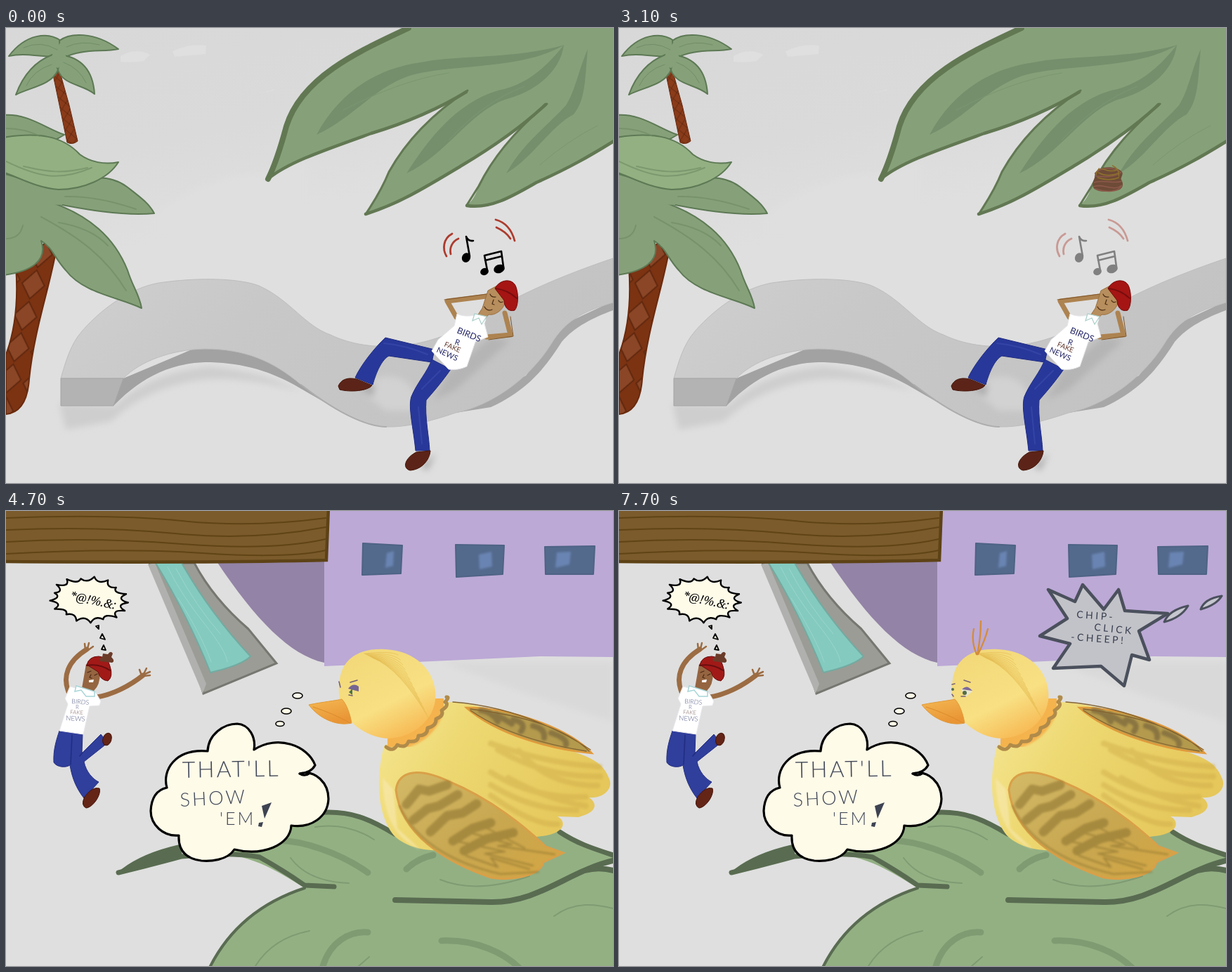
An HTML page that plays this animation: 864x648 px, repeating every 8700 ms.

```html
<!DOCTYPE html>
<html lang="en">
<head>
<meta charset="utf-8">
<title>Beach bird</title>
<style>
html, body { margin: 0; width: 100%; height: 100%; overflow: hidden; background: #dfdfdf }
svg { display: block; width: 100%; height: 100% }
.line { fill: none; stroke-linecap: round; stroke-linejoin: round }
.soft { filter: url(#blur) }
.brushed { filter: url(#smudge) }
.ink { fill: #fffbe9; stroke: #000; stroke-linejoin: round }
.hand { font-family: Lato, "Open Sans", sans-serif }
.leaf { fill: #86a179; stroke: #5d7955; stroke-width: 2; stroke-linejoin: round }
</style>
</head>
<body>
<svg viewBox="0 0 864 648">
<defs>
  <filter id="blur" x="-30%" y="-30%" width="160%" height="160%"><feGaussianBlur stdDeviation="5"/></filter>
  <filter id="smudge"><feGaussianBlur stdDeviation="1.5"/></filter>
  <linearGradient id="sky" x2="0.3" y2="1"><stop stop-color="#d8d8d8"/><stop offset=".3" stop-color="#dadada"/><stop offset=".5" stop-color="#dfdfdf"/></linearGradient>
  <linearGradient id="stone" x2="1" y2=".3"><stop stop-color="#d0d0d0"/><stop offset=".4" stop-color="#c8c8c8"/><stop offset="1" stop-color="#c3c3c3"/></linearGradient>
  <linearGradient id="plumage" x2="1" y2=".4"><stop stop-color="#f6e795"/><stop offset=".4" stop-color="#edd871"/><stop offset="1" stop-color="#e5c75b"/></linearGradient>
  <linearGradient id="wingFill" x2="1" y2=".8"><stop stop-color="#d3b967"/><stop offset=".6" stop-color="#c8a750"/><stop offset="1" stop-color="#d2a645"/></linearGradient>
  <linearGradient id="headFill" x1=".2" x2=".75" y2="1"><stop stop-color="#f2d878"/><stop offset=".6" stop-color="#f8e083"/><stop offset="1" stop-color="#f7b650"/></linearGradient>
  <linearGradient id="beakFill" y2="1" x2=".4"><stop stop-color="#f4b853"/><stop offset="1" stop-color="#e99535"/></linearGradient>
  <pattern id="bark" width="36" height="46" patternUnits="userSpaceOnUse" patternTransform="rotate(14)">
    <rect width="36" height="46" fill="#7c3312"/><path d="M18 2L34 21 18 44 2 25Z" fill="#8a4626" stroke="#61280f" stroke-width="2"/>
  </pattern>
  <pattern id="barkSmall" width="13" height="15" patternUnits="userSpaceOnUse" patternTransform="rotate(-10)">
    <rect width="13" height="15" fill="#8a3b19"/><path d="M0 0L13 15M13 0L0 15" stroke="#5f2810"/>
  </pattern>
</defs>

<g id="beach">
  <rect width="864" height="648" fill="url(#sky)"/>
  <g fill="#dfdfdf">
    <path d="M163 40Q185 27 205 38L196 47Q180 50 163 48ZM237 33Q260 22 285 25L284 37 240 41Z"/>
    <path class="soft" d="M205 270Q290 205 374 208L430 190V300H205Z"/>
    <path d="M360 93L383 87 380 89Z"/>
  </g>
  <!-- Bench -->
  <path class="soft" d="M76 535L155 538Q205 490 290 482 370 490 420 518 320 490 255 505 190 520 150 560L85 572Z" fill="#cecece"/>
  <path d="M167 499L283 450C350 450 420 490 462 538L410 508C370 486 330 476 283 476C230 478 190 500 153 538Z" fill="#a2a2a2"/>
  <path d="M864 389L798 420 740 495 640 548 690 540C745 515 770 480 791 447 810 425 835 413 864 402Z" fill="#a7a7a7"/>
  <path d="M78 499C85 475 92 450 108 432C140 395 185 366 225 362C285 354 340 358 362 368C405 388 425 424 462 437C520 465 600 455 650 425C700 400 740 370 864 328V391C820 404 795 418 776 450C745 500 690 538 640 548C605 560 570 569 541 568C497 563 460 540 420 508C380 474 340 457 283 457C235 458 190 475 167 499Z" fill="url(#stone)" stroke="#bdbdbd"/>
  <path d="M78 499H167L153 538H78Z" fill="#b3b3b3" stroke="#a4a4a4"/>
  <path class="line" d="M420 508C480 555 520 568 541 568" stroke="#adadad" stroke-width="2"/>
  <path class="soft" d="M500 512C545 480 590 500 585 545L540 545Z" fill="#d2d2d2"/>
  <path class="soft" d="M630 490L690 440 718 445 640 515 608 530Z" fill="#aaa" opacity=".6"/>

  <!-- Small palm -->
  <path d="M66 62L76 60 90 110 102 161Q95 167 87 163L75 105Z" fill="url(#barkSmall)" stroke="#67290f"/>
  <g class="leaf">
    <path d="M78 18C60 5 28 8 4 40C30 34 50 43 78 40Z"/>
    <path d="M76 18C90 7 125 4 160 30C135 35 110 28 78 44Z"/>
    <path d="M66 38C40 48 24 68 14 95C35 84 64 82 74 60Z"/>
    <path d="M77 38C108 42 124 62 126 94C110 80 82 82 74 60Z"/>
    <path d="M67 36L78 20 87 45 74 57 60 51Z" stroke="none"/>
    <path class="line" d="M25 28Q50 17 73 31M86 27Q107 17 133 24M29 82Q39 60 65 52M82 49Q104 57 114 78" stroke="#718d68" stroke-width="1"/>
  </g>
  <!-- Large palm -->
  <path d="M56 306L71 318C62 370 40 430 33 500C31 530 20 548 0 550V465C15 425 17 380 14 340Z" fill="url(#bark)" stroke="#6a2a0d" stroke-width="2"/>
  <g class="leaf">
    <path d="M-4 124C30 121 55 142 83 152C60 168 25 171-4 165Z"/>
    <path d="M75 230C115 207 150 210 172 226C190 240 204 250 211 264C165 268 110 258 70 250Z"/>
    <path d="M-4 207L75 230 52 244C120 265 155 300 173 345C180 368 190 380 193 399C160 383 110 378 85 345C68 326 67 314 50 303C60 332 35 347-4 352Z"/>
    <path d="M30 215L85 228 80 252 20 250Z" stroke="none"/>
    <path d="M-4 156C45 148 80 153 105 180C120 191 140 195 160 191C145 215 110 230 75 230C45 228 20 214-4 205Z" fill="#93b082"/>
    <path class="line" d="M0 190C45 212 75 219 122 199M25 197C60 205 80 208 116 199M0 143Q26 143 48 154M84 240Q130 239 185 258M50 269C104 298 142 326 171 374M75 277Q122 285 145 310M0 300Q20 300 24 281" stroke="#718c65" stroke-width="2" opacity=".65"/>
  </g>
  <!-- Overhanging fronds -->
  <path d="M578 0C500 35 420 70 398 140C390 170 383 195 373 213C400 190 450 175 520 150C570 135 620 113 657 89C610 120 570 160 545 205C535 230 522 250 512 265C560 250 600 225 650 195C700 165 740 135 770 108C720 150 690 190 673 225C668 240 662 248 656 252C690 258 720 240 755 220C800 200 830 183 870 158V-5Z" fill="#86a179"/>
  <g class="line" stroke="#627853">
    <path d="M573 0C500 34 421 70 399 140C391 170 383 195 373 215" stroke-width="8"/>
    <path d="M373 215C400 192 450 175 520 150C570 135 620 113 655 91M512 265C560 250 600 225 650 195C700 165 740 135 768 109M656 253C690 258 720 240 755 220C800 200 830 183 870 158" stroke-width="4.5"/>
    <path d="M657 89C610 120 570 160 545 205C535 230 522 250 512 265M770 108C720 150 690 190 673 225L656 252" stroke-width="3"/>
  </g>
  <g fill="#758f6d">
    <path d="M442 152C475 90 530 57 590 49C640 38 720 45 795 24C740 57 650 52 590 64C530 76 500 125 442 152Z"/>
    <path d="M570 207C600 160 640 107 700 89C740 82 770 55 794 24C790 60 755 91 710 102C660 120 625 182 570 207Z"/>
    <path d="M712 207C735 165 770 140 797 110C810 90 815 60 828 30C824 75 825 102 808 123C775 140 750 185 712 207Z"/>
    <path class="line" d="M480 117Q560 75 630 64M630 160Q680 105 738 83M760 195Q800 160 842 139" stroke="#7b9771"/>
  </g>

  <!-- Lounging man -->
  <path class="soft" d="M500 514L525 507 522 525ZM590 625L612 605 600 630Z" fill="#aaa"/>
  <g fill="#28389a" stroke="#202c82">
    <path d="M610 458L540 441C525 455 505 480 497 498L522 508C527 490 535 472 545 467L606 476Z"/>
    <path d="M606 472L633 486C620 505 605 522 598 530C596 555 602 580 603 602H583C580 570 572 540 577 525C585 505 600 490 606 472Z"/>
    <path class="line" d="M538 449Q570 452 600 465M592 514L618 488M587 540L592 592" stroke="#3444a6" stroke-width="2"/>
  </g>
  <g fill="#5c2418" stroke="#441509">
    <path d="M473 510C478 498 490 498 499 500L521 509C515 517 490 519 475 515Z"/>
    <path d="M584 604L604 602C603 615 592 629 575 630C564 627 567 613 584 604Z"/>
  </g>
  <g class="line" stroke-width="7" stroke="#ad8350">
    <path d="M641 412L628 389 684 382M684 440L718 437 710 406"/>
    <path d="M624 387L684 379M687 444L722 439 718 411" stroke="#80572c" stroke-width="1"/>
  </g>
  <path d="M686 374L699 367 711 388C709 402 695 410 687 408L680 416 670 411 678 399Z" fill="#b78e5d" stroke="#9a7040"/>
  <path class="line" d="M689 379Q691 384 697 383M701 388Q703 392 707 390M694 387L692 393 695 394M681 397Q685 404 692 401" stroke="#4b2d16" stroke-width="1.2"/>
  <path d="M696 371C703 357 722 356 726 369C730 380 729 397 724 402C714 405 709 396 709 388Z" fill="#a51513" stroke="#750b0a"/>
  <path class="line" d="M697 371Q714 373 727 385" stroke="#780d0d" stroke-width="2"/>
  <path d="M642 407Q652 412 668 409L683 415 681 421 686 440 668 447 656 482Q643 488 630 486L606 460 615 444 638 424Z" fill="#fff" stroke="#e5e5e9"/>
  <path d="M667 407L664 417 673 413 677 422 684 411Z" fill="#fff" stroke="#a9cec8" stroke-width="1.2"/>
  <g class="hand" fill="#252767">
    <text transform="translate(641 434) rotate(22)" font-size="12.5">BIRDS</text>
    <text transform="translate(638 450) rotate(20)" font-size="11">R</text>
    <text transform="translate(623 453) rotate(23)" font-size="10" fill="#60362a">FAKE</text>
    <text transform="translate(612 461) rotate(25)" font-size="11">NEWS</text>
  </g>

  <g id="notes">
    <path class="line" d="M635 293C622 300 621 315 627 325M644 300C635 304 631 313 633 322M697 273C712 277 720 288 724 303M698 284C707 288 713 292 718 300" stroke="#ad3b2e" stroke-width="2.8"/>
    <ellipse cx="655" cy="327" rx="6" ry="7" transform="rotate(25 655 327)"/>
    <ellipse cx="681" cy="347" rx="6" ry="5" transform="rotate(-20 681 347)"/>
    <ellipse cx="702" cy="343" rx="8" ry="6" transform="rotate(-20 702 343)"/>
    <path class="line" d="M660 325L655 297Q658 304 665 303M685 345L681 324 705 318 708 340M682 331L706 325" stroke="#000" stroke-width="2.6"/>
  </g>
  <g id="dropping">
    <path d="M-18-7C-16-19 14-20 21-9C22-4 17-1 20 2C24 10 20 17 8 17C-5 19-20 18-21 10C-22 3-18 1-18-7Z" fill="#6e4b37"/>
    <g class="line" stroke-width="1.5">
      <path d="M-18-8C-8-18 10-17 19-9 10-2-6-3-18-4M-19 5C-8 0 12 8 20 3M-20 11C-8 5 8 19 20 9M-18 14C0 20 15 18 20 10" stroke="#8d594b"/>
      <path d="M-13-9Q0-2 15-8M-9-15Q6-9 13-13M-14-2Q2 4 16-2M7-19Q17-14 16-4M-12-15Q-17-9-16-6" stroke="#8d702d"/>
    </g>
  </g>
</g>

<g id="revenge">
  <rect width="864" height="648" fill="#dfdfdf"/>
  <path class="soft" d="M620 215H864V300L740 260Z" fill="#d9d9d9"/>
  <path d="M453 0H864V208L760 207 453 221Z" fill="#bca9d6"/>
  <path d="M300 72H453V216C405 206 355 155 300 72Z" fill="#9383a6"/>
  <path d="M508 46L564 49 562 89 507 91ZM640 48L709 49 707 90 641 94ZM767 51L838 50 836 90 768 90Z" fill="#536a8d" stroke="#4e6385" stroke-width="2" stroke-linejoin="round"/>
  <path class="brushed" d="M542 60L552 57 551 78 540 81ZM673 62L691 58 692 79 674 83ZM784 59L804 58 802 76 782 81Z" fill="#6984b2"/>
  <path d="M204 74H268Q295 125 345 168L385 217 281 260C260 190 235 130 204 74Z" fill="#9b9c95" stroke="#777771" stroke-width="3"/>
  <path d="M202 76L212 74 285 246 280 260Z" fill="#b0b1ae"/>
  <path d="M213 74H250Q290 145 348 207Q335 220 291 230C275 190 250 135 213 74Z" fill="#84cabf" stroke="#73aaa1" stroke-width="2"/>
  <path class="line" d="M230 80Q250 120 282 160T315 215M242 82Q270 135 305 175M245 124Q280 180 292 215" stroke="#9bd6cd"/>
  <path d="M-5-5H459L456 70Q300 74-5 72Z" fill="#7b5b2b" stroke="#5d4216" stroke-width="4.5"/>
  <path class="line" d="M0 10Q150 4 250 14T455 10M0 27Q130 21 240 32T455 23M0 44Q120 37 250 47T455 40M0 61Q160 52 280 60T455 56" stroke="#604416" stroke-width="2"/>

  <!-- Running man -->
  <g class="line" stroke="#9c6c43">
    <path d="M91 262C78 236 89 213 115 197M129 265C150 262 175 250 195 234" stroke-width="7"/>
    <path d="M113 198L112 189M116 196L118 188M117 198L124 193M193 234L190 226M196 232L200 224M196 233L205 229M196 235L205 234" stroke-width="2.5"/>
  </g>
  <path d="M76 313L109 317 108 345 135 318 145 330 111 357C114 372 124 382 132 386L111 409C100 395 94 380 91 362C85 366 72 365 68 358C67 340 72 325 76 313Z" fill="#303e9c" stroke="#263180"/>
  <path class="line" d="M94 319Q93 340 92 361M105 349L109 344" stroke="#202d80" stroke-width="1.5"/>
  <g fill="#642517" stroke="#451307">
    <ellipse cx="144" cy="325" rx="6" ry="9" transform="rotate(18 144 325)"/>
    <path d="M112 407Q123 392 133 395C136 404 124 422 114 423Q106 419 112 407Z"/>
  </g>
  <path d="M114 218L134 230Q134 248 125 256L122 263 107 258Z" fill="#956541"/>
  <path class="line" d="M116 230L121 228M126 234L130 232M121 233L119 237 122 238" stroke="#4d2916" stroke-width="1.2"/>
  <path d="M118 241L125 240 124 244 118 244Z" fill="#fff"/>
  <path d="M115 219Q118 207 132 207Q145 208 148 221Q153 236 145 242Q134 241 131 229Z" fill="#a11a18" stroke="#6a0d0d"/>
  <path class="line" d="M115 220Q133 217 148 227" stroke="#690e0e" stroke-width="2"/>
  <path d="M134 214Q132 208 137 208L138 203 145 204Q149 198 152 203L150 208Q156 214 151 216Z" fill="#6b3b29"/>
  <path d="M91 250L128 259 135 271 133 277 119 278 110 318 76 313 88 275 84 267Z" fill="#fff" stroke="#e8e8ed"/>
  <path d="M100 249L98 257 107 255 114 264 126 264 126 257Z" fill="#fff" stroke="#a8d5d7" stroke-width="1.5"/>
  <g class="hand" fill="#525982" font-weight="300">
    <text x="93" y="274" font-size="9" transform="rotate(4 93 274)">BIRDS</text>
    <text x="99" y="282" font-size="8">R</text>
    <text x="91" y="289" font-size="8" transform="rotate(3 91 289)" fill="#775d58">FAKE</text>
    <text x="85" y="298" font-size="9.5" transform="rotate(3 85 298)">NEWS</text>
  </g>
  <path class="ink" d="M128 164L132 163 132 168ZM134 181L137 175 141 183ZM136 197L139 191 142 198Z" stroke-width="1.8"/>
  <g id="curse">
    <path class="ink" stroke-width="2.4"/>
    <text text-anchor="middle" font-family="Noto Serif, serif" font-style="italic" font-size="17">*@!%.&amp;:</text>
  </g>

  <!-- Leaf perch -->
  <path d="M250 487C320 450 400 425 455 426C500 428 530 440 553 460L790 455C815 475 840 480 864 490V498L820 513 864 512V648H290C320 590 370 555 425 537C390 515 350 490 310 490Z" fill="#93b083"/>
  <g class="line" stroke="#596c51">
    <path d="M425 537C370 555 320 590 290 650" stroke-width="4"/>
    <path d="M160 515Q210 503 250 492 320 485 361 493 395 512 425 533L467 535M442 430C490 425 520 440 553 460M788 457C815 475 840 482 870 492" stroke-width="7"/>
    <path d="M554 554L690 557C760 558 800 512 868 497M824 512Q845 506 868 513" stroke-width="8"/>
    <path d="M160 515Q190 489 247 476L250 491Z" fill="#596c51" stroke-width="2"/>
  </g>
  <g class="line" stroke="#7f9b72">
    <path d="M373 470C420 465 480 490 515 515M570 510Q585 495 608 490M450 652C460 613 490 598 515 600M620 612C670 610 710 630 732 652" stroke-width="9"/>
    <path d="M440 450Q485 443 524 468M405 494Q430 528 488 530M618 525Q670 546 745 520M780 577C810 555 840 560 864 566M355 648Q380 608 432 598M502 648Q509 642 517 635" stroke-width="2"/>
  </g>

  <!-- Bird -->
  <path d="M538 335C525 385 530 435 552 462C575 485 620 490 680 475L770 462C800 455 795 440 785 435L815 436C845 428 840 415 830 408C850 410 866 395 858 380C850 358 830 350 800 340C750 300 690 275 628 272Z" fill="url(#plumage)"/>
  <g class="line brushed" stroke="#cfac4a" stroke-width="8" opacity=".45">
    <path d="M700 340Q770 380 846 378M690 331Q770 360 845 364M690 372Q750 410 825 407M690 390Q750 427 812 426M690 405Q750 448 785 446M730 341Q770 391 842 391M715 380Q770 411 825 420"/>
  </g>
  <path class="brushed" d="M536 380Q537 462 590 482L557 452 551 396Z" fill="#f8e9ae" opacity=".65"/>
  <path d="M655 280C710 278 800 308 834 345C780 340 700 320 655 280Z" fill="#b39a4d" stroke="#e09a3c" stroke-width="2.5"/>
  <path class="line brushed" d="M676 284Q692 286 700 300M698 290L720 303M722 297Q742 302 733 314M750 306Q768 310 766 323M776 316Q800 324 797 333" stroke="#7d693c" stroke-width="8" opacity=".75"/>
  <path class="line" d="M661 282Q785 297 830 342M661 284Q720 325 826 342M636 272Q740 280 832 340" stroke="#846431" stroke-width="1.3"/>
  <path d="M555 397C559 368 590 366 630 385C690 410 740 450 768 478L793 487 765 500C760 520 720 527 690 522C625 500 562 460 555 397Z" fill="url(#wingFill)" stroke="#d9a048" stroke-width="3"/>
  <g class="line brushed" stroke="#89712f" opacity=".55">
    <path d="M570 418L588 396 602 399 628 390M580 440L600 424 616 420 643 404M604 457L628 434 650 430 670 417M636 470L664 452 690 444M652 484L684 467 722 458" stroke-width="13"/>
    <path d="M560 420Q594 492 704 517L758 514M640 470L710 485 682 488 750 505M650 455L720 475 700 477 781 489M672 445L738 480M655 491L700 507 690 494 745 510" stroke-width="2.5"/>
  </g>
  <path class="line brushed" d="M550 330Q602 325 616 273" stroke="#f5b34e" stroke-width="22"/>
  <path d="M475 240C480 205 510 195 540 197C590 200 615 235 611 270C605 310 560 330 530 322C510 318 485 300 478 280C473 265 473 250 475 240Z" fill="url(#headFill)"/>
  <path id="down" class="line" stroke="#e3b94f" opacity=".6"/>
  <path class="line" d="M541 336q10 8 16-3q12 6 16-5q14 2 14-8q13 0 13-11q13-3 12-13q12-4 8-12q12-8 5-12q7-8 2-7" stroke="#b08b4a" stroke-width="5"/>
  <path d="M431 276C450 272 470 270 478 268C485 275 490 290 492 302C470 307 445 295 431 276Z" fill="url(#beakFill)" stroke="#e09a38"/>
  <path class="line" d="M437 279Q465 288 490 302" stroke="#dc8a2c"/>
  <g id="eyesLow">
    <path d="M487 253Q494 244 502 250L502 257Z" fill="#766594"/><path d="M488 258L493 253 493 262Z" fill="#48734e"/>
    <path class="line" d="M474 243L476 251M490 244L500 241M488 262L493 263" stroke="#715e72" stroke-width="1.5"/>
  </g>
  <g id="eyesOpen">
    <path d="M487 254Q495 247 503 257L493 265Z" fill="#e9e5cd"/><path d="M488 254Q495 246 503 256Z" fill="#7d6999"/><circle cx="492" cy="259" r="3" fill="#536d4a"/><circle cx="475" cy="254" r="2" fill="#536d4a"/>
    <path class="line" d="M474 247L478 246M491 241L500 244M487 264L493 264M474 261L476 264" stroke="#776177" stroke-width="1.5"/>
  </g>
  <path id="crest" class="line" d="M509 204C503 190 503 177 505 168M510 204C514 185 515 165 515 157M511 204C518 190 522 180 525 168" stroke="#d48c3b" stroke-width="2.3"/>

  <!-- Thoughts -->
  <path class="ink" d="M229 394C222 370 240 338 287 342C288 318 310 303 329 303C346 304 356 322 353 340C386 318 430 334 440 362Q434 373 418 374C441 368 459 388 459 410C458 436 434 452 406 448C405 476 365 492 325 482C315 498 290 499 278 498C255 495 245 482 246 462C224 464 206 447 206 427C207 408 215 397 229 394Z" stroke-width="3.2"/>
  <path class="line" d="M418 374Q425 379 433 373" stroke="#000" stroke-width="3"/>
  <g class="ink" stroke-width="1.6"><ellipse cx="415" cy="263" rx="7" ry="4"/><ellipse cx="399" cy="285" rx="7" ry="4"/><ellipse cx="390" cy="303" rx="6" ry="3.5"/></g>
  <g class="hand" fill="#414757" font-weight="300" font-size="32" letter-spacing="3">
    <text x="251" y="380" transform="rotate(-1 251 380)">THAT'LL</text>
    <text x="248" y="421" font-size="27" transform="rotate(-3 248 421)">SHOW</text>
    <text x="304" y="447" font-size="25">'EM</text>
  </g>
  <path d="M364 420L378 415 368 438ZM360 444L366 443 364 450 359 449Z" fill="#3e4352"/>
  <g id="chirp">
    <g id="chirpBubble">
      <path d="M611 112L649 129 660 105 690 140 711 112 720 142 781 146 740 171 755 212 730 205 719 249 686 221 618 224 642 189 599 178 638 153Z" fill="#c2c3c8" stroke="#4b505d" stroke-width="4.5" stroke-linejoin="round"/>
      <g class="hand" fill="#383e50" font-size="14" letter-spacing="3.5">
        <text x="651" y="152" transform="rotate(4 651 152)">CHIP-</text><text x="676" y="170" transform="rotate(6 676 170)">CLICK</text><text x="643" y="184" transform="rotate(4 643 184)">-CHEEP!</text>
      </g>
    </g>
    <path id="chirpTail" d="M787 159Q794 142 821 136Q811 153 787 159ZM839 141Q844 126 869 122Q861 135 839 141Z" fill="#c5c6ce" stroke="#4b505d" stroke-width="3" stroke-linejoin="round"/>
  </g>
</g>
</svg>
<script>
const LOOP = 8700, SCENE_CUT = 3700, CHIRP_START = 5700;
const $ = id => document.getElementById(id);
const show = (id, on) => $(id).style.display = on ? '' : 'none';
const set = (node, attrs) => Object.entries(attrs).forEach(([k, v]) => node.setAttribute(k, v));

// Piecewise-linear value from [step, value] pairs.
function track(points, x) {
  const i = Math.max(1, points.findIndex(p => p[0] >= x));
  const [[x0, y0], [x1, y1]] = [points[i - 1], points[i]];
  return y0 + (y1 - y0) * (x - x0) / (x1 - x0);
}

// Sharp tips joined by inward curves.
function burst({ cx, cy, rx, ry, tilt }, spikes = 17) {
  const point = (k, r) => {
    const a = k / spikes * 2 * Math.PI, u = rx * r * Math.cos(a), v = ry * r * Math.sin(a);
    const c = Math.cos(tilt), s = Math.sin(tilt);
    return `${(cx + u * c - v * s).toFixed(1)} ${(cy + u * s + v * c).toFixed(1)} `;
  };
  let d = 'M' + point(0, 1);
  for (let k = 1; k <= spikes; k++) d += 'Q' + point(k - .5, .68) + point(k, k % 3 ? 1 : .9);
  return d + 'Z';
}

const poses = {
  up: { cx: 110, cy: 131, rx: 54, ry: 36, tilt: -.3, turn: -13 },
  level: { cx: 111, cy: 130, rx: 55, ry: 36, tilt: .02, turn: 0 },
  down: { cx: 118, cy: 126, rx: 56, ry: 33, tilt: .08, turn: 12 }
};
const curseCues = [[3700, 'up'], [4200, 'level'], [4700, 'down'], [5200, 'level'],
  [5700, 'down'], [6200, 'up'], [6700, 'level'], [7700, 'down']];
const [curseShape, curseText] = $('curse').children;

// Feather strands fanning from the crown to the back of the head.
let strands = '';
for (let k = 0; k < 14; k++) strands += `M${510 + k} ${203 + k / 2}Q${548 + k} ${199 + k * 2} ${558 + k * 3.4} ${205 + k * 7}`;
$('down').setAttribute('d', strands);

function drawBeach(t) {
  const falling = t >= 2000, step = Math.floor((t - 2000) / 100);
  const swayed = !falling && Math.floor(t / 500) % 2;
  set($('notes'), {
    transform: swayed ? 'translate(4 3)' : '',
    opacity: falling ? track([[0, .95], [2, .87], [11, .42], [16, 0]], step) : 1
  });
  show('dropping', falling);
  if (falling) set($('dropping'), {
    transform: `translate(695.5 ${track([[0, 42], [2, 86], [11, 215], [16, 331]], step)})`
  });
}

function drawRevenge(t) {
  const pose = poses[curseCues.filter(cue => cue[0] <= t).pop()[1]];
  set(curseShape, { d: burst(pose) });
  set(curseText, { x: pose.cx + 6, y: pose.cy + 6, transform: `rotate(${pose.turn} ${pose.cx} ${pose.cy})` });
  const chirping = t >= CHIRP_START, shrunk = t >= 6200 && t < 7700;
  show('chirp', chirping);
  show('crest', chirping);
  show('eyesOpen', chirping);
  show('eyesLow', !chirping);
  set($('chirpBubble'), { transform: shrunk ? `rotate(${t < 6700 ? 0 : 2} 685 175) translate(34 9) scale(.95)` : '' });
  set($('chirpTail'), { transform: t >= 6200 ? 'translate(-11 -1)' : '' });
}

const start = performance.now();
function draw() {
  const t = (performance.now() - start) % LOOP, onBeach = t < SCENE_CUT;
  show('beach', onBeach);
  show('revenge', !onBeach);
  (onBeach ? drawBeach : drawRevenge)(t);
  requestAnimationFrame(draw);
}
draw();
</script>
</body>
</html>
```
